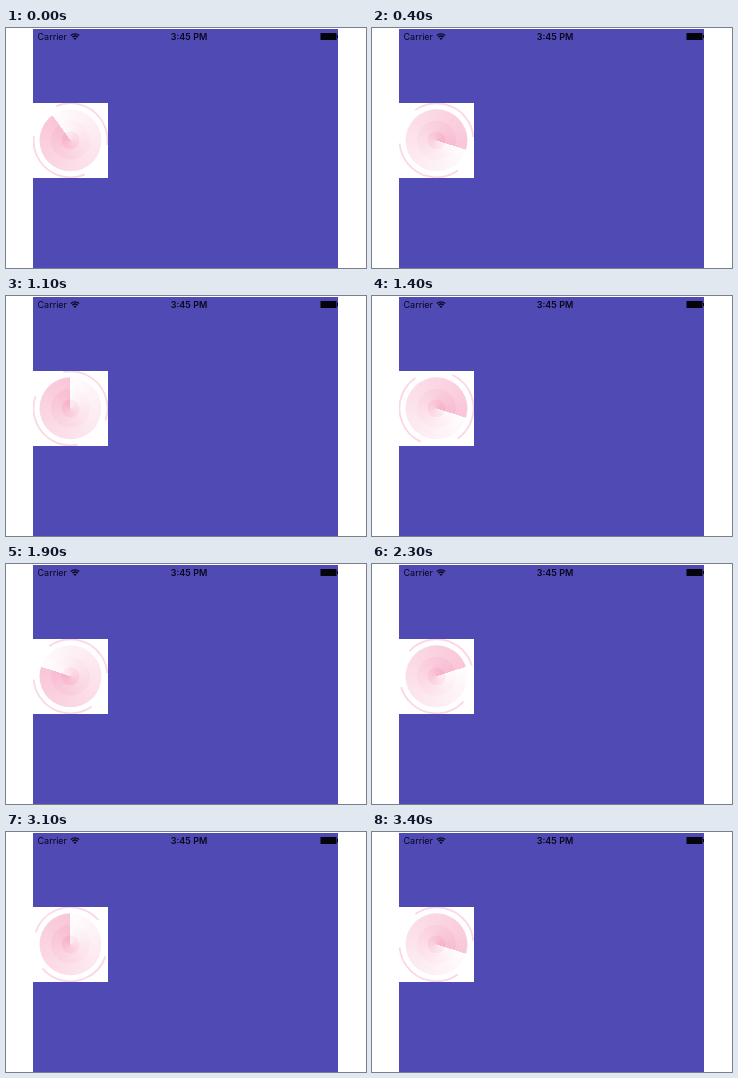
Write an HTML page with a canvas that moves like this. It is 360x240 px and loops after 3500 ms.

```html
<!DOCTYPE html>
<html lang="en">
<head>
<meta charset="utf-8">
<title>Radar loader</title>
<style>
  html, body { margin: 0; width: 100%; height: 100%; overflow: hidden; background: #fff; }
  canvas { display: block; width: 360px; height: 240px; }
</style>
</head>
<body>
<canvas id="stage" width="360" height="240"></canvas>
<script>
const ctx = document.getElementById('stage').getContext('2d');
const LOOP = 3500, STEP = 100;
const CX = 64.5, CY = 112.3;
const rad = deg => deg * Math.PI / 180;
const pink = a => `rgba(242, 130, 170, ${a})`;

function rect(color, x, y, w, h) {
  ctx.fillStyle = color;
  ctx.fillRect(x, y, w, h);
}

function disc(r, fill) {
  ctx.fillStyle = fill;
  ctx.beginPath();
  ctx.arc(CX, CY, r, 0, Math.PI * 2);
  ctx.fill();
}

function sweep(r, angle, from, to) {
  const g = ctx.createConicGradient(angle, CX, CY);
  g.addColorStop(0, pink(from));
  g.addColorStop(1, pink(to));
  disc(r, g);
}

function arc(x, y, r, from, to, width) {
  ctx.lineWidth = width;
  ctx.beginPath();
  ctx.arc(x, y, r, from, to);
  ctx.stroke();
}

function label(text, x, align, weight) {
  ctx.font = `${weight} 9px Inter, "Liberation Sans", sans-serif`;
  ctx.textAlign = align;
  ctx.fillText(text, x, 12);
}

function statusBar() {
  ctx.fillStyle = '#08071a';
  label('Carrier', 31.5, 'left', 400);
  label('3:45 PM', 183, 'center', 600);

  // Wi-Fi
  ctx.strokeStyle = '#08071a';
  arc(69, 12, 6.1, rad(-133), rad(-47), 1.3);
  arc(69, 12, 3.8, rad(-133), rad(-47), 1.3);
  ctx.beginPath();
  ctx.moveTo(69, 12);
  ctx.arc(69, 12, 2.2, rad(-133), rad(-47));
  ctx.fill();

  // Battery
  rect('#05040c', 314.5, 5, 16, 7);
  rect('#05040c', 331, 7, 1, 3);
}

function radar(t) {
  const angle = rad(234 + t * 0.36);
  const ring = rad(127 - t * 0.48);

  ctx.save();
  ctx.beginPath();
  ctx.rect(27, 75, 75, 75);
  ctx.clip();
  rect('#fff', 27, 75, 75, 75);

  ctx.strokeStyle = pink(0.32);
  for (const turn of [0, Math.PI]) {
    arc(CX, CY, 37, ring + turn - rad(60), ring + turn + rad(60), 1.8);
  }

  sweep(31, angle, 0.02, 0.46);
  sweep(19.5, angle, 0.02, 0.13);
  sweep(9, angle, 0.1, 0.2);
  ctx.restore();
}

function draw(now) {
  const t = Math.floor((now % LOOP) / STEP) * STEP;
  rect('#fff', 0, 0, 360, 240);
  rect('#504ab4', 27, 1, 305, 239);
  statusBar();
  radar(t);
}

const start = performance.now();
function frame() {
  draw(performance.now() - start);
  requestAnimationFrame(frame);
}
frame();
</script>
</body>
</html>
```
